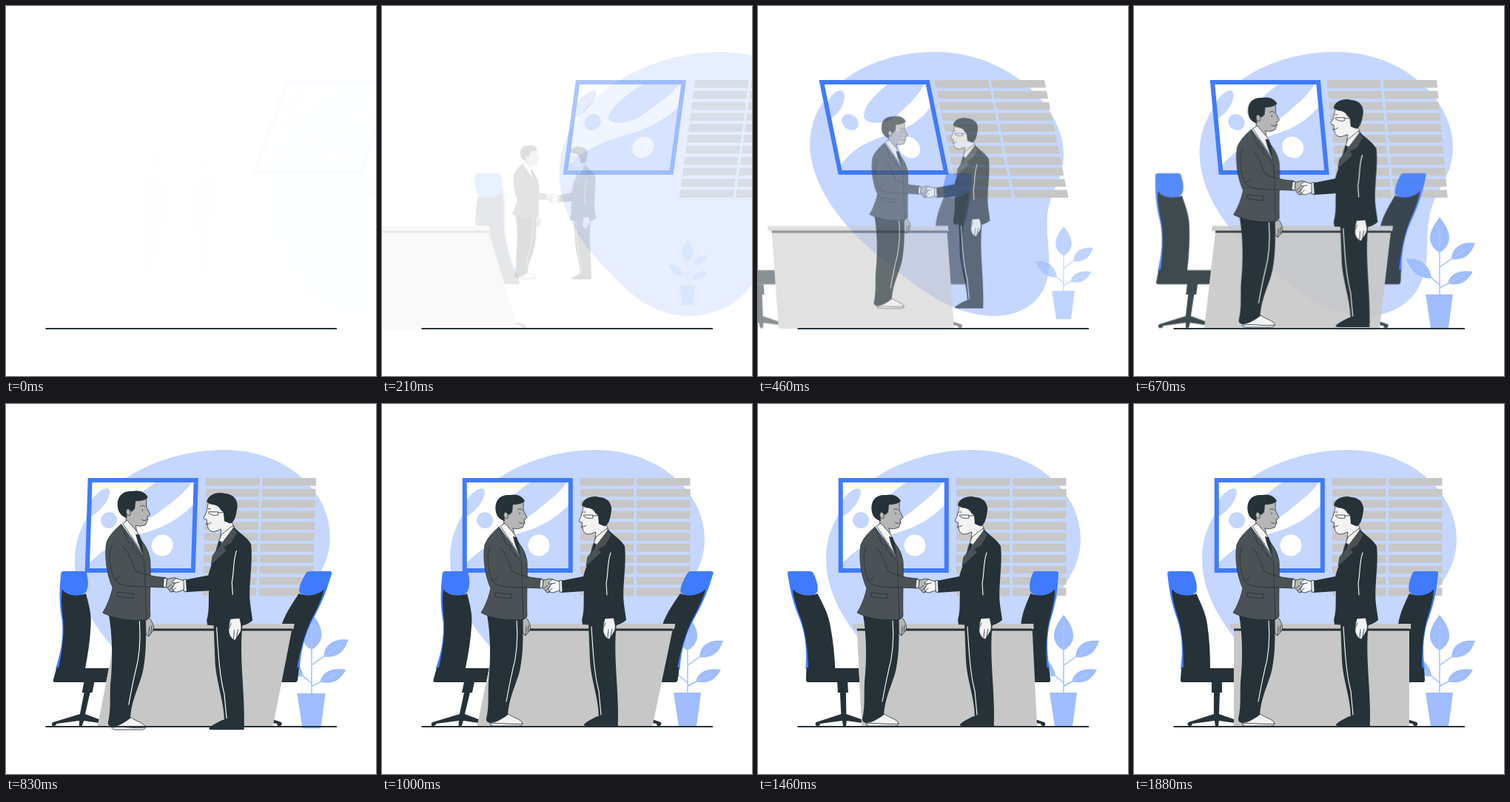
These frames come from a looping animation (500 by 500 pixels, 1.93 s). An HTML page:

```html
<!DOCTYPE html>
<html lang="en">
<head>
<meta charset="utf-8">
<title>Business deal</title>
<style>
  html, body { margin: 0; width: 100%; height: 100%; overflow: hidden; background: #fff; }
  svg { display: block; width: 100vw; height: 100vh; }
  .dark { fill: #263238; }
  .blue { fill: #407bff; }
  .pale { fill: #c5d6ff; }
  .mid { fill: #9fbdff; }
  .grey { fill: #c7c7c7; }
  .white { fill: #fff; }
  .suit { fill: #4b5255; stroke: #263238; stroke-width: .8; }
  .skin { fill: #b6b6b6; stroke: #263238; stroke-width: .8; }
  .light { fill: #f3f3f3; stroke: #263238; stroke-width: .8; }
  .ink { fill: none; stroke: #263238; stroke-width: .8; stroke-linecap: round; }
  .seam { fill: none; stroke: #fff; stroke-width: 1.1; stroke-linecap: round; }
  .stem { fill: none; stroke: #9fbdff; stroke-width: 1.4; }
  .rib { fill: none; stroke: #b9cfff; stroke-width: .8; }
</style>
</head>
<body>
<svg viewBox="0 0 500 500">
  <defs>
    <g id="chair">
      <path class="blue" d="M45 229Q45 226 48 226H75Q79 226 80 229C84 239 86 246 84 254L66 270 70 358H63C68 325 62 300 57 287C49 264 47 248 45 229Z"/>
      <path class="dark" d="M51 250C57 259 75 261 84 256C89 267 97 282 99 298C102 318 103 338 103 357H135V376H66Q62 376 63 371L64 358Q66 355 67 356C67 334 66 314 61 294C56 278 51 262 51 250Z"/>
      <path class="dark" d="M105 376H119V390H116L115 419 135 426 147 429Q152 431 150 435H145Q143 433 143 432L115 428 114 435H110L109 428 79 432Q79 435 76 435H74Q71 432 74 430L108 419V390H105Z"/>
    </g>
    <clipPath id="canvas"><path d="M112 103H255V225H112Z"/></clipPath>
  </defs>

  <g id="blob">
    <path class="pale" d="M92 207C94 122 190 62 289 62C375 62 436 120 436 182C436 230 405 245 394 288C386 320 390 345 376 372C362 402 330 419 294 419C235 418 195 375 160 342C125 308 91 260 92 207Z"/>
  </g>

  <g id="picture">
    <path class="white" d="M110 101H257V227H110Z"/>
    <g class="pale" clip-path="url(#canvas)">
      <ellipse cx="123" cy="133" rx="9" ry="23" transform="rotate(38 123 133)"/>
      <circle cx="139" cy="157" r="11"/>
      <path d="M159 151C161 132 187 116 208 100H252C246 116 224 132 204 148C190 159 163 162 159 151Z"/>
      <path d="M110 220C140 185 170 180 200 170C225 161 242 148 256 132V226H110Z"/>
    </g>
    <circle class="white" cx="212" cy="191" r="14.5"/>
    <path fill="none" stroke="#407bff" stroke-width="6" d="M111.700 103H254.800V225H111.700Z"/>
  </g>

  <g id="blinds" class="grey"></g>

  <g id="plant">
    <path class="stem" d="M413 391V328M413 353L433 339M413 381L429 373M413 377L398 364"/>
    <path class="mid" d="M413 285C422 296 427 306 426 316Q424 327 413 333Q402 327 400 316C399 306 404 296 413 285Z"/>
    <path class="mid" d="M429 342C430 325 443 318 461 320C456 336 446 344 429 342Z"/>
    <path class="mid" d="M424 375C427 361 441 356 458 359C450 374 439 379 424 375Z"/>
    <path class="mid" d="M367 342C384 340 399 347 402 368C385 369 374 358 367 342Z"/>
    <path class="rib" d="M413 300V333M429 342L450 327M424 375L447 364M402 368L380 350"/>
    <path class="mid" d="M394 390H431L425 436H401Z"/>
  </g>

  <g id="office">
    <use href="#chair"/>
    <use href="#chair" transform="translate(456) scale(-1 1)"/>
    <path class="grey" d="M130 297H374V304H372V436H135V304H130Z"/>
    <path class="dark" d="M135 303.500H372V306.500H135Z"/>
  </g>

  <g id="people">
    <!-- left man -->
    <path class="light" d="M146 431C152 426 163 422 171 419C177 424 189 426 190 432Q189 435 185 435H149Q145 434 146 431Z"/>
    <path class="ink" d="M147 432C160 430 175 434 190 432"/>
    <path class="skin" d="M190 286L196 290C201 298 202 303 198 308L194 313Q190 312 190 304Z"/>
    <path class="ink" d="M194 312L195 301M197 308L198 299"/>
    <path class="dark" d="M142 285L190 289C191 310 191 335 187 356C183 377 172 393 170 420C162 426 154 431 146 431Q140 430 141 425C145 409 143 392 144 375C147 348 147 313 142 285Z"/>
    <path class="seam" d="M182 293C184 318 182 341 176 362Q172 380 168 402"/>
    <path class="skin" d="M164 148C168 140 176 133 191 132L191 144 196 153Q195 156 192 156L193 160 190 167Q183 170 177 168L180 182 165 169Z"/>
    <path class="dark" d="M166 158C160 157 155 152 154 146C151 130 160 122 173 123C181 121 190 124 193 131Q189 136 177 136L176 146 172 150 168 147 165 151Z"/>
    <path class="skin" d="M169 155C164 155 163 147 167 146Q171 147 170 154Z"/>
    <path class="ink" d="M183 143Q186 140 189 143M186 147V149M185 160Q188 163 192 160"/>
    <path class="light" d="M160 165L166 161 179 176 186 190 186 204 172 183Z"/>
    <path class="dark" d="M177 179L182 180 186 192 186 205 180 190Z"/>
    <path class="suit" d="M158 166C152 172 144 178 139 190C136 207 139 232 147 249C144 263 139 274 134 282C151 291 173 293 192 291L196 287C195 262 197 231 196 213C194 201 190 194 184 187L187 208 171 184Z"/>
    <path class="suit" d="M147 192C139 205 145 229 149 238C155 249 173 247 215 249L216 236C197 235 184 230 177 227C172 217 169 203 160 195"/>
    <path class="ink" d="M158 167L168 190 174 191 173 196 188 213M188 213C190 240 190 270 191 290M153 255L175 257 174 263 154 261ZM150 238L157 234"/>

    <!-- right man -->
    <path class="dark" d="M273 433Q276 429 291 422L318 424 319 435H277Q272 435 273 433Z"/>
    <path class="dark" d="M279 296H317C312 340 320 383 319 430Q304 435 293 430C294 400 283 377 281 347Z"/>
    <path class="seam" d="M283 301C285 330 286 361 293 388L296 420"/>
    <path class="light" d="M273 136C270 143 272 149 266 157Q266 160 270 160L271 168Q272 176 280 176L289 173 287 192 306 170 297 150 290 137Z"/>
    <path class="dark" d="M270 137C271 127 285 123 294 126C307 127 313 137 309 150C308 158 304 166 300 165L293 162 292 151 288 147Q286 141 275 140Z"/>
    <path class="ink" d="M272 146H275M273 150H285V154Q278 156 273 152ZM285 151H294M269 166Q273 167 276 164"/>
    <path class="light" d="M289 180L304 168 306 173 294 191 281 208 284 194Z"/>
    <path class="dark" d="M286 188L290 189 284 205 280 210Z"/>
    <path class="dark" d="M306 170C312 177 322 182 328 192C331 216 324 248 327 271L330 292Q322 299 310 300L271 298 270 292C274 278 272 265 273 253L242 255 241 239 272 233C275 222 279 211 285 202Z"/>
    <path class="suit" d="M305 171L278 207 276 219 296 201 293 196 302 191 310 177Z"/>
    <path class="seam" d="M309 201C304 215 306 229 303 242L304 258"/>
    <path class="light" d="M301 290L313 289C315 297 317 303 313 309L307 318Q301 316 299 308Q298 300 301 290Z"/>
    <path class="ink" d="M305 316L306 305M309 314L311 304M302 296L299 303"/>

    <!-- handshake -->
    <path class="light" d="M214 237L218 237 217 249 213 248ZM239 239L243 238 244 254 240 254Z"/>
    <path class="skin" d="M218 238L227 236Q235 237 236 244L231 253 223 255 217 248Z"/>
    <path class="light" d="M240 240L230 237Q225 240 225 243L229 243 225 249Q225 255 231 255L240 252Z"/>
    <path class="ink" d="M219 249L224 245M221 252L227 247M225 254L230 249M229 243L234 242"/>
  </g>

  <path fill="none" stroke="#263238" stroke-width="2" d="M53.500 436H447"/>
</svg>
<script>
const LOOP = 1930, STEP = 1000 / 24;
const $ = id => document.getElementById(id);
const mix = (a, b, p) => a + (b - a) * p;
const tan = deg => Math.tan(deg * Math.PI / 180);
const clamp = x => Math.min(1, Math.max(0, x));

for (let row = 0; row < 11; row++)
  for (const x of [268, 344])
    $("blinds").insertAdjacentHTML("beforeend",
      `<rect x="${x}" y="${100 + row * 14.85}" width="72.5" height="10.500"/>`);

// cubic-bezier(.36, -.01, .5, 1.38), which overshoots near its end
function ease(x) {
  const curve = (a, b, u) => 3 * (1 - u) ** 2 * u * a + 3 * (1 - u) * u * u * b + u ** 3;
  let lo = 0, hi = 1;
  for (let i = 0; i < 24; i++) {
    const u = (lo + hi) / 2;
    if (curve(.36, .5, u) < x) lo = u; else hi = u;
  }
  return curve(-.01, 1.38, lo);
}

// Slides in from one side (1 = right, -1 = left), leaning, then rocks upright around cy
function rush(id, x, side, cy) {
  let shift = 0, lean, alpha = 1;
  if (x < .6) {
    alpha = ease(x / .6);
    shift = 250 * (1 - alpha);
    lean = mix(tan(-20), tan(10), alpha);
  } else if (x < .8) lean = mix(tan(10), tan(-2), ease((x - .6) / .2));
  else lean = mix(tan(-2), 0, ease((x - .8) / .2));
  const k = side * lean;
  $(id).setAttribute("transform", `matrix(1 0 ${k} 1 ${side * shift - k * cy} 0)`);
  $(id).setAttribute("opacity", clamp(alpha));
}

function zoom(id, x, cx, cy) {
  const p = ease(x), s = mix(.5, 1, p);
  $(id).setAttribute("transform", `translate(${cx} ${cy}) scale(${s}) translate(${-cx} ${-cy})`);
  $(id).setAttribute("opacity", clamp(p));
}

function draw(now) {
  const t = Math.max(1, Math.floor((now % LOOP + 4) / STEP)) * STEP;
  const fast = clamp(t / 1000);
  rush("blob", fast, 1, 240);
  rush("picture", fast, 1, 164);
  rush("blinds", fast, 1, 180);
  rush("office", clamp(t / 1900), -1, 331);
  zoom("plant", fast, 413, 360);
  zoom("people", fast, 233, 279);
}

const start = performance.now();
function tick() {
  draw(performance.now() - start);
  requestAnimationFrame(tick);
}
tick();
</script>
</body>
</html>
```
